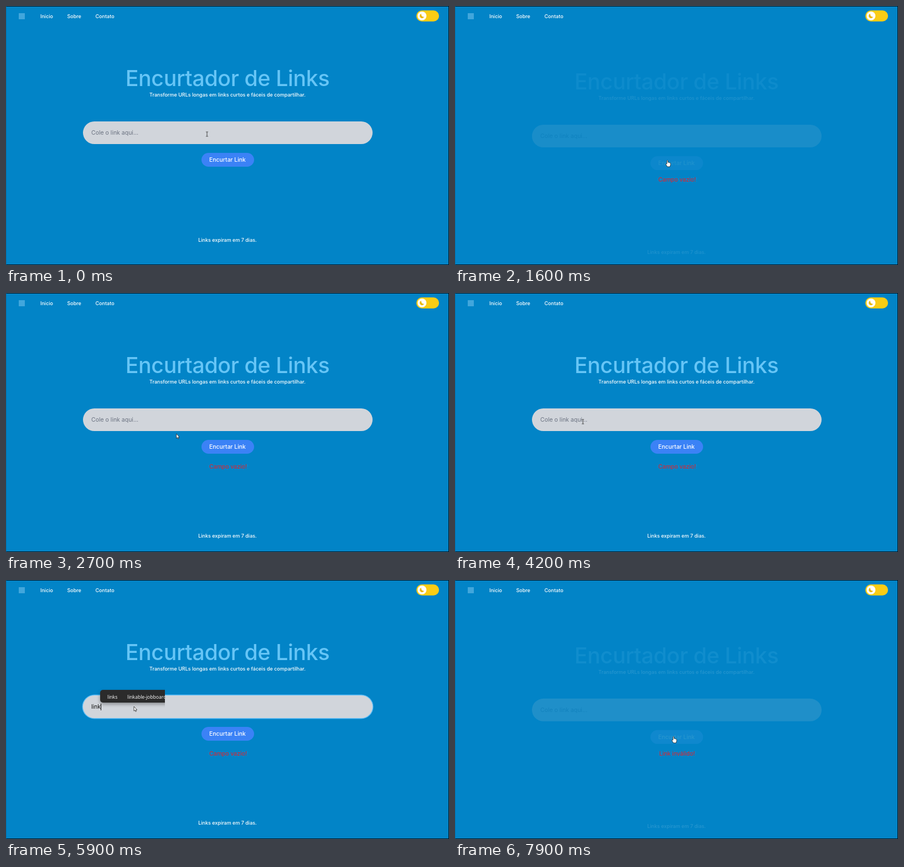
Animation, 800 px wide and 469 px high, one loop 8 s. Source, as an HTML page:

```html
<!DOCTYPE html>
<html lang="pt-BR">
<head>
<meta charset="utf-8">
<title>Encurtador de Links</title>
<style>
  html, body { margin: 0; width: 100%; height: 100%; overflow: hidden; background: #0284c7; }
  #stage {
    position: relative; width: 800px; height: 469px; overflow: hidden;
    background: #0284c7; color: #fff;
    font: 500 9px Inter, sans-serif; font-optical-sizing: none;
  }
  #stage div, #stage svg { position: absolute; box-sizing: border-box; }
  .text { white-space: pre; line-height: 14px; margin-top: -7px; }
  .mid { left: 0; width: 800px; text-align: center; }
  #frame { inset: 0; border: 1px solid #04131f; border-left-color: #0273ae; }
  #logo { left: 23px; top: 13px; width: 11px; height: 11px; background: #41a6dc; }
  #toggle { left: 741px; top: 8px; width: 41px; height: 20px; border-radius: 10px; background: #facc15; }
  #title { top: 131px; font-size: 39.3px; letter-spacing: -.01em; color: #66c5f6; }
  #field {
    left: 139px; top: 209px; width: 523px; height: 41px;
    border-radius: 21px; background: #d1d5db;
  }
  #value { left: 154px; top: 229.5px; font-weight: 400; font-size: 10.5px; }
  #caret { top: 223.5px; width: 1px; height: 12px; background: #111; }
  #button { left: 352.5px; top: 265.5px; width: 95.5px; height: 25.5px; border-radius: 13px; }
  #label { top: 278.5px; font-size: 10.4px; }
  #error { left: 1px; top: 314.5px; font-weight: 400; font-size: 10.5px; color: #ee2029; }
  #clip { left: 160px; top: 190px; height: 60px; overflow: hidden; }
  #popup {
    left: 10px; top: 9px; width: 164px; height: 23px; border-radius: 5px;
    background: #2b2b2b; box-shadow: 0 3px 6px rgba(0, 0, 0, .35);
    font: 400 8.6px "Open Sans", "Noto Sans", sans-serif;
  }
  #popup .text { top: 12.5px; }
</style>
</head>
<body>
<div id="stage">
  <div id="logo"></div>
  <div class="text" style="left:62px;top:18.5px">Inicio</div>
  <div class="text" style="left:110.5px;top:18.5px">Sobre</div>
  <div class="text" style="left:161.5px;top:18.5px">Contato</div>
  <div id="toggle"></div>
  <svg style="left:741px;top:8px" width="41" height="20">
    <circle cx="10.3" cy="10" r="8" fill="#fff"/>
    <path d="M9 6A4.2 4.2 0 1 0 14.2 11.6A4.4 4.4 0 0 1 9 6Z" fill="#eab910"/>
  </svg>

  <div id="content" style="inset:0">
    <div id="title" class="text mid">Encurtador de Links</div>
    <div class="text mid" style="top:161.2px">Transforme URLs longas em links curtos e fáceis de compartilhar.</div>
    <div id="field"></div>
    <div id="value" class="text"></div>
    <div id="caret"></div>
    <div id="button"></div>
    <div id="label" class="text mid">Encurtar Link</div>
    <div id="footer" class="text mid">Links expiram em 7 dias.</div>
  </div>
  <div id="error" class="text mid"></div>

  <div id="clip"><div id="popup">
    <div class="text" style="left:13px">links</div>
    <div class="text" style="left:49px">linkable-jobboard</div>
    <div class="text" style="left:137px">linka</div>
  </div></div>

  <div id="frame"></div>
  <svg id="cursor" width="24" height="24" viewBox="-12 -12 24 24">
    <g id="beam" fill="none" stroke="#333" stroke-width=".9">
      <path d="M-2-4H-.6L0-3.5L.6-4H2M0-3.5V3.5M-2 4H-.6L0 3.5L.6 4H2"/>
    </g>
    <g id="arrow" fill="#fff" stroke="#222" stroke-width=".8">
      <path d="M0-4V4.2L1.8 2.6L3 5.3L4.4 4.7L3.2 2.1H5.6Z"/>
    </g>
    <g id="hand" fill="#fff" stroke="#222" stroke-width=".8" stroke-linejoin="round">
      <path d="M-2.3 1V-5Q-1.4-6.3-.5-5V-1.8Q.6-2.4 1.2-1.5Q2.3-1.9 2.8-1Q4.2-1.2 4.2.3V2.8L3.2 6H-1.4L-4.2 2Q-4.4.4-3.2.6Z"/>
    </g>
  </svg>
</div>
<script>
const LOOP = 8000, FADE = 680, FIRST = 1460, SECOND = 7740;
const $ = id => document.getElementById(id);
const clamp = x => Math.min(1, Math.max(0, x));
const ramp = (t, from, to) => clamp((t - from) / (to - from));
const smooth = p => p * p * (3 - 2 * p);
const show = (id, on) => { $(id).style.display = on ? '' : 'none'; };

// Pointer stops: leave time, arrival time, x, y
const moves = [
  [0, 0, 363, 232],
  [100, 900, 385, 285],
  [2300, 3100, 231, 233],
  [6600, 7400, 396, 289]
];

function pointer(t) {
  let [, , x, y] = moves[0];
  for (const [from, to, nx, ny] of moves) {
    const p = smooth(to > from ? ramp(t, from, to) : 1);
    x += (nx - x) * p;
    y += (ny - y) * p;
  }
  return { x, y };
}

function drawContent(t, hover) {
  const start = t < SECOND ? FIRST : SECOND;
  const shown = t < FIRST ? 1 : smooth(ramp(t, start, start + FADE));
  $('content').style.opacity = shown;
  $('content').style.transform = `translateY(${6.8 * (1 - shown)}px)`;
  $('footer').style.top = (t < FIRST ? 424.2 : 439.7) + 'px';
  $('error').textContent = t < FIRST ? '' : t < SECOND ? 'Campo vazio!' : 'Link inválido!';
  $('button').style.background = hover ? '#60a5fa' : '#3b82f6';
}

function drawField(t) {
  const typed = t < SECOND ? 'link'.slice(0, Math.max(0, Math.floor((t - 5400) / 100))) : '';
  const focus = ramp(t, 4200, 4500) * (1 - ramp(t, 7600, 7700));
  $('value').textContent = typed || 'Cole o link aqui...';
  $('value').style.color = typed ? '#111' : '#6b7280';
  $('field').style.boxShadow = `0 0 0 1.4px rgba(96, 190, 246, ${focus})`;
  show('caret', (t >= 4300 && t < 4800) || (t >= 5500 && t < 6100));
  $('caret').style.left = 154 + (typed ? $('value').offsetWidth : 0) + 'px';
  show('clip', t >= 5900 && t < 7600);
  $('clip').style.width = (t < 6100 ? 127 : 190) + 'px';
}

function drawCursor(t, { x, y }, hover) {
  const overField = y < 250 && !(t >= 5500 && t < 6700);
  const kind = hover ? 'hand' : overField ? 'beam' : 'arrow';
  for (const id of ['hand', 'beam', 'arrow']) show(id, id === kind);
  $('cursor').style.transform = `translate(${x - 12}px, ${y - 12}px)`;
}

function draw(now) {
  const t = now % LOOP;
  const at = pointer(t);
  const hover = at.y > 265 && at.y < 292;
  drawContent(t, hover);
  drawField(t);
  drawCursor(t, at, hover);
  requestAnimationFrame(draw);
}

const origin = performance.now();
draw(0);
function draw0() { return performance.now() - origin; }
</script>
</body>
</html>
```
